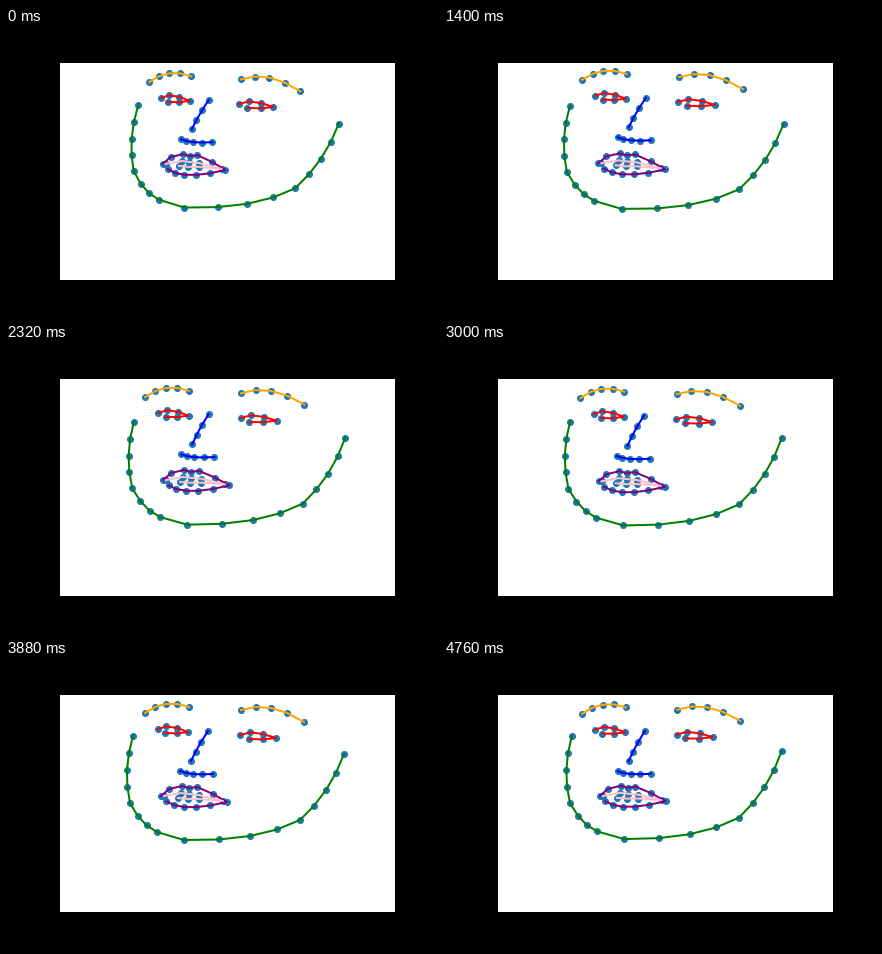
A matplotlib script that plays this animation: 432 by 288 pixels, repeating every 4800 ms.

```python
import numpy as np
import matplotlib.pyplot as plt
from matplotlib.animation import FuncAnimation

W, H, DPI = 432, 288, 72
FRAMES, STEP = 120, 40


def curve(n, start, bend, end):
    """n points spread evenly over a quadratic Bezier curve."""
    u = np.linspace(0, 1, n)[:, None]
    a, b, c = map(np.array, (start, bend, end))
    return (1 - u) ** 2 * a + 2 * u * (1 - u) * b + u ** 2 * c


def eye(x, y, width):
    along = np.array([0, .28, .64, 1, .63, .24])
    down = np.array([0, -2.6, -1, 3, 4.4, 4])
    return np.column_stack([x + width * along, y + down])


jaw = np.vstack([curve(5, (127, 76), (116.5, 110.5), (124, 143))[:-1],
                 curve(4, (124, 143), (134.5, 164.5), (151, 172)),
                 curve(5, (178, 180), (252, 182), (294, 160))[:-1],
                 curve(5, (294, 160), (324, 133), (338, 94))])
upper_lip = [(155, 136), (163, 129), (176, 126), (183, 128), (191, 127),
             (207, 134)]
lips = np.vstack([upper_lip,
                  curve(7, (221, 142), (168, 155), (155, 136))[:-1]])
inner_lips = np.array([(158, 136), (175, 133), (183, 134), (193, 135),
                       (217, 141), (193, 139), (182, 139), (172, 138)])

# Colour, points and how far the part stands out from the jaw line.
PARTS = [
    ("green", jaw, 0),
    ("orange", curve(5, (139, 53), (159, 38), (183, 47)), 1),
    ("orange", curve(5, (235, 50), (263.5, 40), (298, 62)), 1),
    ("blue", curve(4, (202, 71), (191, 87.5), (185, 101)), 1),
    ("blue", curve(5, (174, 111), (183.5, 115.5), (207, 114)), 1),
    ("red", eye(152, 69, 30), 1),
    ("red", eye(234, 75, 36), 1),
    ("purple", lips, .6),
    ("pink", inner_lips, .6)]

face = np.vstack([pts for _, pts, _ in PARTS])
sizes = [len(pts) for _, pts, _ in PARTS]
depth = np.repeat([d for _, _, d in PARTS], sizes)
cuts = np.cumsum(sizes)[:-1]

# A pose moves each point by shift + x gain + y gain + depth gain.
basis = np.column_stack([np.ones(len(face)), (face - (220, 110)) / 100, depth])
TIMES = [0, 720, 1400, 2320, 3000, 3880, 4760]
POSES = np.array([
    [(0, -4.7, -2.5, -1.1), (.9, .3, -1.8, -.6)],
    [(-.6, -1.2, -15, -5), (1, 4, 1, .8)],
    [(.1, 1.2, 0, 0), (1.7, .3, -1, -3.3)],
    [(1.6, 0, 2.3, -.2), (.8, -1, -.8, -1.9)],
    [(0, .2, 2, -1.3), (.8, -.9, .4, -.2)],
    [(0, 0, 0, 0), (0, 0, 0, 0)],
    [(.7, -.7, 1.7, -1.2), (-1.2, -1.3, -.4, .8)]])


def landmarks(t):
    i = min(np.searchsorted(TIMES, t, side="right"), len(TIMES) - 1) - 1
    u = (t - TIMES[i]) / (TIMES[i + 1] - TIMES[i])
    ease = (1 - np.cos(np.pi * u)) / 2
    pose = (1 - ease) * POSES[i] + ease * POSES[i + 1]
    sway = np.sin(np.pi * u)
    return face + basis @ pose.T + sway


fig = plt.figure(figsize=(W / DPI, H / DPI), dpi=DPI, facecolor="black")
ax = fig.add_axes([.125, .125, .775, .755], facecolor="white")
ax.set_xlim(.125 * W, .9 * W)
ax.set_ylim(.875 * H, .12 * H)
ax.set_xticks([])
ax.set_yticks([])
ax.spines[:].set_visible(False)

dots = ax.scatter([], [], s=36, color="C0", linewidth=1, zorder=1)
lines = [ax.plot([], [], color=color, lw=2)[0] for color, _, _ in PARTS]


def draw(frame):
    pts = landmarks(frame * STEP)
    for line, part in zip(lines, np.split(pts, cuts)):
        line.set_data(part[:, 0], part[:, 1])
    dots.set_offsets(pts)
    return [dots, *lines]


anim = FuncAnimation(fig, draw, frames=FRAMES, interval=STEP,
                     repeat=True, repeat_delay=0, blit=False)
plt.show()
```
